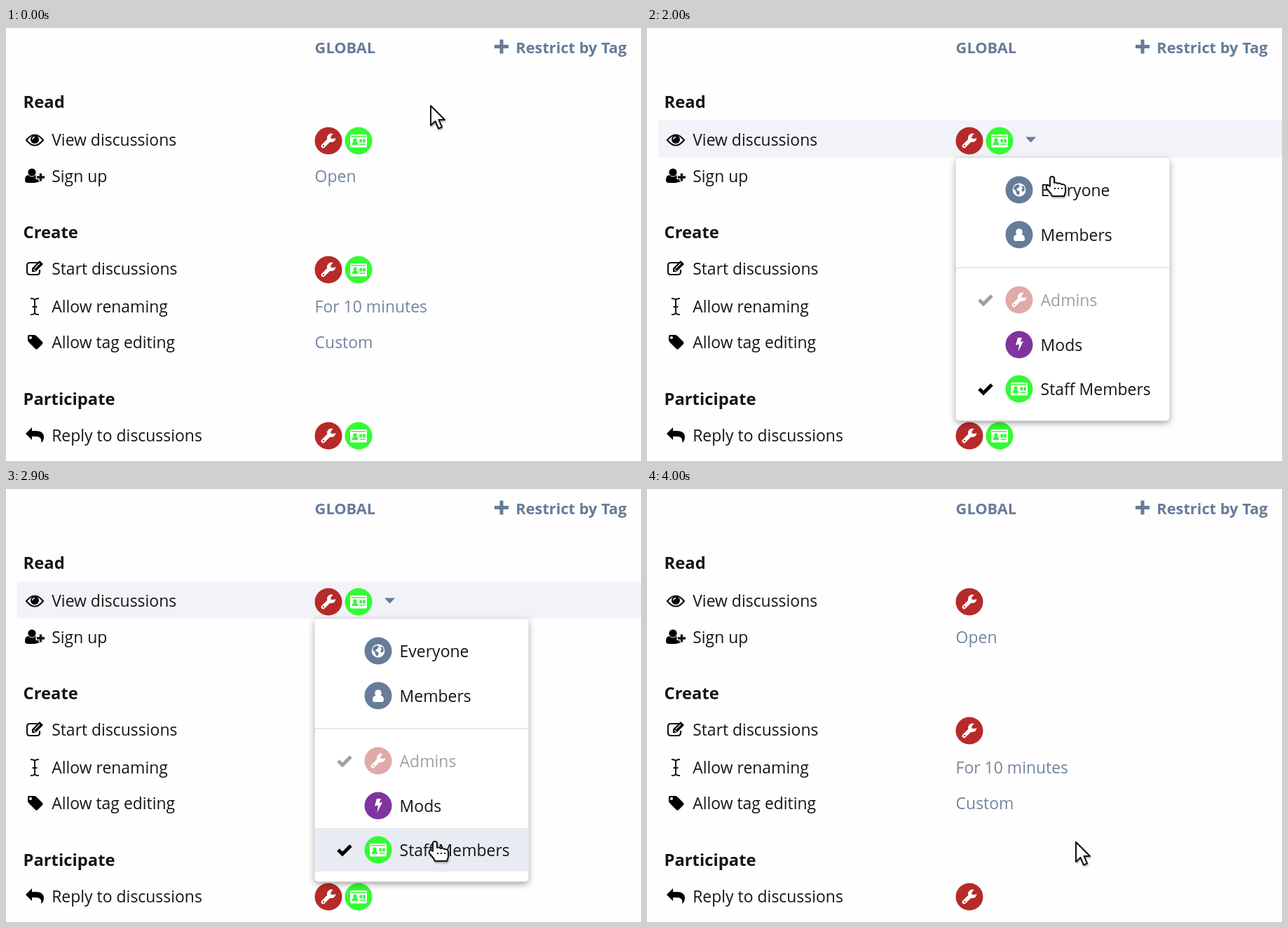
Recreate the animation shown at these times as an HTML page. Size 906 px wide and 618 px high, loop 4100 ms.

```html
<!DOCTYPE html>
<html lang="en">
<head>
<meta charset="utf-8">
<title>Permissions grid</title>
<style>
html, body { margin: 0; width: 100%; height: 100%; overflow: hidden; background: #fefefe; }
svg { display: block; width: 906px; height: 618px; font: 22.95px "Open Sans", sans-serif; }
text { fill: #151515; white-space: pre; }
.head { font-size: 23.8px; font-weight: 700; }
.top { font-size: 21.8px; font-weight: 700; fill: #667c99; }
.muted { fill: #7485a1; }
#panel { fill: #fff; filter: drop-shadow(0 3px 5px rgba(0, 0, 0, .38)); }
#arrow, #hand { filter: drop-shadow(1px 2px 1px rgba(0, 0, 0, .3)); }
</style>
</head>
<body>
<svg viewBox="0 0 906 618">
  <defs>
    <g id="eye">
      <path d="M-12 0Q-6-7.5 0-7.5T12 0Q6 7.5 0 7.5T-12 0Z" fill="none" stroke="#151515" stroke-width="2.2"/>
      <circle cy="-1" r="6"/>
      <path d="M-3.3-1A3.3 3.3 0 0 1 0-4.3" fill="none" stroke="#fff" stroke-width="1.4"/>
    </g>
    <g id="userPlus">
      <circle cx="-4" cy="-5" r="5.6"/>
      <path d="M-9-1Q-4 4 1-1Q3-1 4 1V4H7V9H3Q2 10 0 10H-10Q-14 10-14 6Q-14-1-9-1Z"/>
      <path d="M1.5 2H14M8.5-4.5V8.5" stroke="#fefefe" stroke-width="6"/>
      <path d="M3 2H14M8.5-3.5V7.5" stroke="#151515" stroke-width="3.4"/>
    </g>
    <g id="compose">
      <path d="M5-8H-7Q-11-8-11-4V5Q-11 9-7 9H3Q7 9 7 5V2" fill="none" stroke="#151515" stroke-width="2.2"/>
      <path d="M-4 5V0L7-11L12-6L1 5Z"/>
      <path d="M-2 1L1 4M0 0L7-7" stroke="#fff" stroke-width="1.1"/>
    </g>
    <path id="beam" d="M-6-11Q0-11 0-8Q0-11 6-11M0-8V9M-6 12Q0 12 0 9Q0 12 6 12M-3.5 1H3.5"
      fill="none" stroke="#151515" stroke-width="2"/>
    <path id="tag" fill-rule="evenodd" d="M-10-9Q-10-11-8-11H-1Q1-11 3-9L11-1Q12 0 11 2L4 9Q2 10 1 9L-8 0Q-10-2-10-4Z
      M-6-9A2 2 0 1 0-6-5A2 2 0 1 0-6-9Z"/>
    <path id="reply" d="M-13-2L-4-11V-6H1Q13-6 13 3Q13 8 9 11Q11 2 1 2H-4V7Z"/>
    <path id="tick" d="M-9 0L-3 6L9-6" fill="none" stroke-width="5"/>

    <g id="wrench">
      <path d="M-7.5 7.5L3-3" stroke="#fff" stroke-width="5.6" stroke-linecap="round"/>
      <circle cx="4.2" cy="-4.2" r="6.2" fill="#fff"/>
      <path d="M3-3.6L4-7.2L9-12L13-5L7.5-3Z" fill="currentColor"/>
      <circle cx="-7" cy="7" r="1.2" fill="currentColor"/>
    </g>
    <g id="card" fill="currentColor">
      <rect x="-12" y="-9" width="24" height="18.5" rx="2" fill="#fff"/>
      <path d="M-10.5-6.8H10.5V-5.4H-10.5Z"/>
      <circle cx="-5" cy="-1" r="2.7"/>
      <path d="M-9.3 6Q-9.3 1-5 1T-.7 6Z"/>
      <path d="M1.5-2.5H5V2.5H1.5ZM6.2-2.5H9.8V2.5H6.2ZM1.5 4.2H9.8V5.8H1.5Z"/>
    </g>
    <path id="bolt" d="M-2-10H4L1.5-4L6-5L-1.5 10L0-.5L-5 .6Z" fill="#fff"/>
    <path id="user" d="M-4.6-5A4.8 4.8 0 0 1 4.6-5Q5-2 3.5 0Q8 0 8 6Q8 9 5 9H-5Q-8 9-8 6Q-8 0-3.5 0Q-5-2-4.6-5Z" fill="#fff"/>
    <g id="globe">
      <circle r="9.4" fill="#fff"/>
      <path d="M-7-5L-2-8L1-6L-1-3L-4-1L-2 1L1 3L-1 8L-4 5L-5 1L-8-1ZM3-6L7-5L8 0L5 3L3 0L5-2Z" fill="currentColor"/>
    </g>
  </defs>

  <rect id="row" x="16" y="132" width="890" height="53" fill="#f1f3f8"/>
  <g id="page"></g>
  <g id="staff"></g>
  <path id="caret" d="M540 155.5H555L547.5 163.5Z" fill="#667c99"/>
  <g id="menu">
    <rect id="panel" x="440.5" y="185.5" width="305" height="375" rx="5"/>
    <rect id="hover" x="440.5" width="305" fill="#e8ebf2"/>
    <path d="M441 342H745" stroke="#e3e8f0" stroke-width="2"/>
    <g id="items"></g>
  </g>
  <path id="arrow" d="M0 1V29L6.5 23L11 33.5L16 31.3L11.5 21H20Z" fill="#fff" stroke="#111" stroke-width="2" stroke-linejoin="round"/>
  <g id="hand" stroke="#111" stroke-width="2" stroke-linejoin="round">
    <path d="M-3 14V3Q-3 0 0 0T3 3V9Q5 7.5 8 10Q11 8.5 13 11Q19 10.5 19 15V22L17 28H0L-2 24L-8 17Q-9 13-6 12Z" fill="#fff"/>
    <path d="M3 17H16" stroke-width="1.8" stroke-dasharray="2 3"/>
  </g>
</svg>
<script>
const $ = id => document.getElementById(id);
const RED = '#b72a2a', GREEN = '#33fb33', SLATE = '#667c99', PURPLE = '#80349e';
const LOOP = 4100, STEP = 100;

const text = (x, y, s, cls = '') => `<text x="${x}" y="${y}" class="${cls}">${s}</text>`;
const icon = (id, x, y, attrs = '') => `<use href="#${id}" x="${x}" y="${y}" ${attrs}/>`;
const badge = (id, x, y, color) =>
  `<g transform="translate(${x} ${y})" color="${color}"><circle r="19.5" fill="currentColor"/>${icon(id, 0, 0)}</g>`;

const headings = [['Read', 114], ['Create', 300], ['Participate', 538]];
// label, baseline, icon, icon centre, setting
const rows = [
  ['View discussions', 168, 'eye', 160],
  ['Sign up', 220, 'userPlus', 211, 'Open'],
  ['Start discussions', 352, 'compose', 343],
  ['Allow renaming', 405.5, 'beam', 397, 'For 10 minutes'],
  ['Allow tag editing', 457, 'tag', 449, 'Custom'],
  ['Reply to discussions', 589.5, 'reply', 581]
];
const badgeRows = [161, 345, 582];
// label, centre, icon, colour, tick colour, opacity
const options = [
  ['Everyone', 231, 'globe', SLATE],
  ['Members', 295, 'user', SLATE],
  ['Admins', 388, 'wrench', RED, '#151515', .4],
  ['Mods', 452, 'bolt', PURPLE],
  ['Staff Members', 515, 'card', GREEN, '#000']
];

$('page').innerHTML =
  text(440.6, 35.5, 'GLOBAL', 'top') + text(727.3, 35.5, 'Restrict by Tag', 'top') +
  `<path d="M697 26.5H717M707 16.5V36.5" stroke="${SLATE}" stroke-width="5"/>` +
  headings.map(([s, y]) => text(24.5, y, s, 'head')).join('') +
  rows.map(([s, y, id, cy, value]) =>
    icon(id, 41, cy) + text(65.2, y, s) + (value ? text(440.6, y, value, 'muted') : '')).join('') +
  badgeRows.map(y => badge('wrench', 460, y, RED)).join('');
$('staff').innerHTML = badgeRows.map(y => badge('card', 503, y, GREEN)).join('');
$('items').innerHTML = options.map(([s, y, id, color, tick, opacity = 1]) =>
  `<g opacity="${opacity}">${badge(id, 531, y, color)}${text(561.6, y + 8.5, s)}` +
  `${tick ? icon('tick', 483, y, `stroke="${tick}"`) : ''}</g>`).join('');

// time, pointer x, pointer y
const path = [
  [0, 606, 110], [300, 606, 110], [800, 571, 138], [1200, 556, 156], [1600, 556, 158],
  [2000, 578, 212], [2500, 614, 448], [2900, 612, 503], [LOOP, 612, 503]
];
// top and bottom of the selectable options
const zones = [[199, 263], [263, 327], [420, 484], [484, 546]];

function pointer(t) {
  const i = path.findIndex(p => p[0] > t);
  const [t0, x0, y0] = path[i - 1], [t1, x1, y1] = path[i];
  const k = (t - t0) / (t1 - t0);
  return [x0 + (x1 - x0) * k, y0 + (y1 - y0) * k];
}

const show = (id, on) => $(id).setAttribute('visibility', on ? 'inherit' : 'hidden');

function draw(t) {
  const [x, y] = pointer(t);
  const open = t >= 1500 && t < 3900;
  const active = open || (t < 3900 && y > 132 && y < 185);
  const zone = t > 2000 && zones.find(([a, b]) => y >= a && y < b);
  const hand = active && t < 3300;
  show('row', active);
  show('caret', active);
  show('menu', open);
  show('staff', t < 3900);
  show('hover', open && zone);
  if (zone) {
    $('hover').setAttribute('y', zone[0]);
    $('hover').setAttribute('height', zone[1] - zone[0]);
  }
  show('hand', hand);
  show('arrow', !hand);
  $(hand ? 'hand' : 'arrow').setAttribute('transform', `translate(${x} ${y})`);
}

function tick() {
  const t = performance.now() % LOOP;
  draw(Math.floor(t / STEP) * STEP);
  requestAnimationFrame(tick);
}
tick();
</script>
</body>
</html>
```
